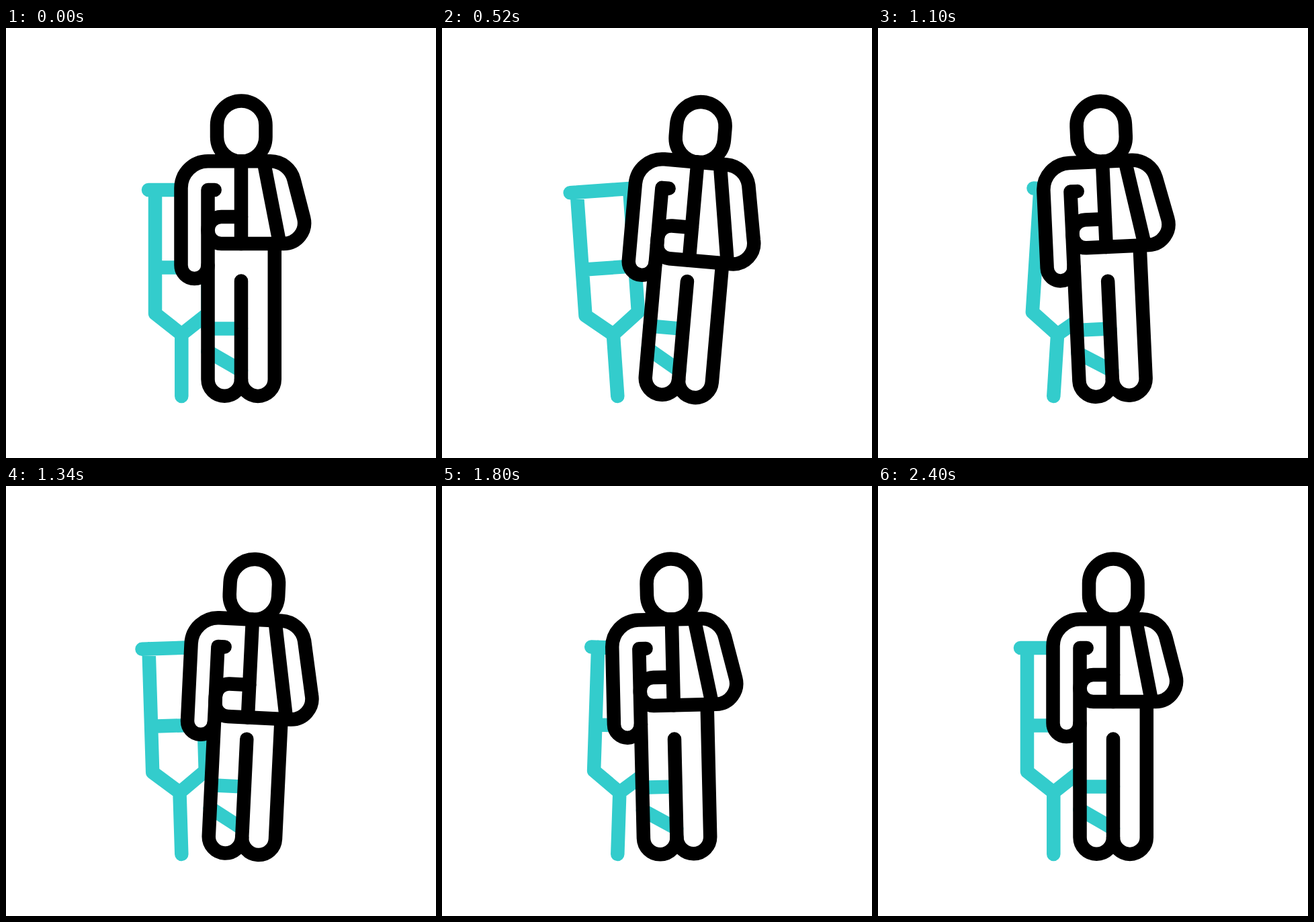
These frames come from a looping animation (640x640 px, 2.42 s). An HTML page:

```html
<!DOCTYPE html>
<html lang="en">
<head>
<meta charset="utf-8">
<title>Patient with crutch</title>
<style>
  html, body { margin: 0; width: 100%; height: 100%; overflow: hidden; background: #fff; }
  svg { display: block; width: 100%; height: 100%; }
  path, rect { fill: none; stroke-width: 20.5; stroke-linecap: round; stroke-linejoin: round; }
  .teal { stroke: #33cccc; }
  .ink { stroke: #000; }
  .skin { fill: #fff; }
</style>
</head>
<body>
<svg viewBox="0 0 640 640">
  <g id="crutch" class="teal">
    <path d="M212 241H311M222 241V425L261.3 456L300.6 425V241M222 356.5H300.6M261.3 456V548"/>
  </g>
  <g id="body">
    <g class="skin">
      <path id="torsoFill" class="skin"/>
      <path class="skin" d="M300.5 241V523A24.7 24.7 0 0 0 350 523A24.9 24.9 0 0 0 399.8 523V241Z"/>
    </g>
    <path class="teal" d="M300.5 447.5H350M300.5 481.5L350 510"/>
    <g class="ink">
      <rect x="314" y="108.5" width="72.5" height="90" rx="36.2"/>
      <path id="torso"/>
      <path id="sling"/>
      <path d="M310.7 241H300.5V523A24.7 24.7 0 0 0 350 523V376.5"/>
      <path id="leg"/>
    </g>
  </g>
</svg>
<script>
  const LOOP = 2420;
  // time, body angle, crutch angle, forearm drop
  const STEPS = [
    [0, 0, 0, 0],
    [530, 5, -4, 24],
    [983, -4, 5, 0],
    [1387, 3, -2, 24],
    [1695, -2, 3, 0],
    [2036, 1, -2, 24],
    [2410, 0, 0, 0],
    [LOOP, 0, 0, 0]
  ];
  const el = id => document.getElementById(id);
  const ease = p => (1 - Math.cos(Math.PI * p)) / 2;

  function pose(t) {
    const i = STEPS.findIndex(s => s[0] > t);
    const a = STEPS[i - 1], b = STEPS[i];
    const p = ease((t - a[0]) / (b[0] - a[0]));
    return [1, 2, 3].map(k => a[k] + (b[k] - a[k]) * p);
  }

  function draw(t) {
    const [lean, tilt, drop] = pose(t);
    const bar = 321 + drop, wrist = 281 + drop * 0.63;

    el('body').setAttribute('transform', `rotate(${lean} 350 548)`);
    el('crutch').setAttribute('transform', `rotate(${tilt} 261.3 548)`);

    const outline = 'M300.5 353A20 20 0 0 1 260.5 353V238.3A40 40 0 0 1 300.5 198.3H393.5' +
      `A36.2 36.2 0 0 1 428.5 225.7L443.2 ${282.7 + drop}A31 31 0 0 1 413.3 ${bar}`;
    el('torsoFill').setAttribute('d', `${outline}H300.5Z`);
    el('torso').setAttribute('d',
      `${outline}H320.5A20 20 0 0 1 300.5 ${bar - 20}V${wrist + 20}A20 20 0 0 1 320.5 ${wrist}H350`);
    el('sling').setAttribute('d', `M350 198.3V${bar}M383.5 198.3L407.4 ${bar}`);
    el('leg').setAttribute('d', `M350 523A24.9 24.9 0 0 0 399.8 523V${bar}`);
  }

  const start = performance.now();
  function tick() {
    draw((performance.now() - start) % LOOP);
    requestAnimationFrame(tick);
  }
  tick();
</script>
</body>
</html>
```
